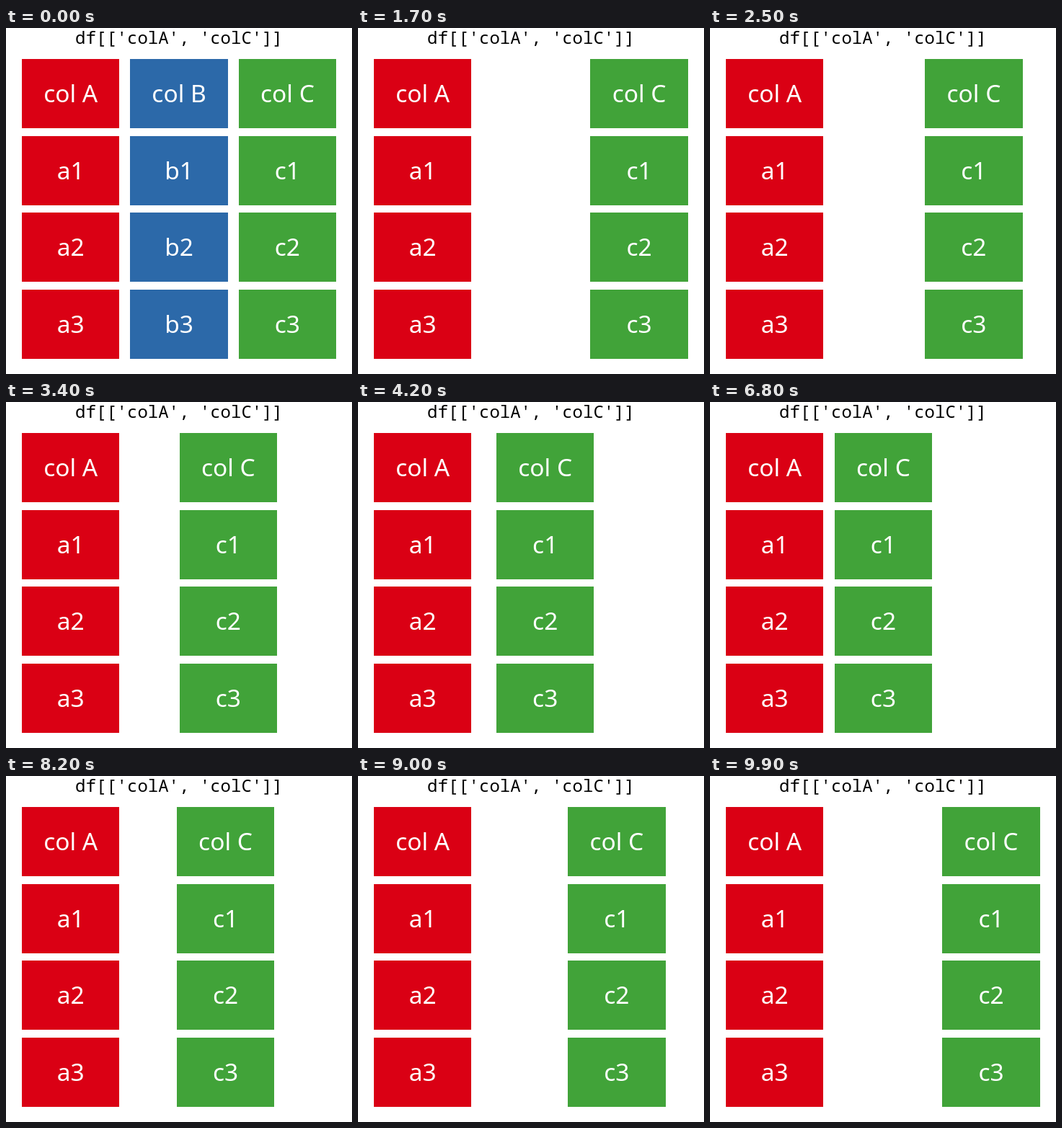
An HTML page with a canvas that plays this animation: 480 by 480 pixels, repeating every 10 s.

```html
<!DOCTYPE html>
<html lang="en">
<head>
<meta charset="utf-8">
<title>Column selection</title>
<style>
  html, body { margin: 0; width: 100%; height: 100%; overflow: hidden; background: #fff; }
  canvas { display: block; width: 480px; height: 480px; }
</style>
</head>
<body>
<canvas id="stage" width="480" height="480"></canvas>
<script>
const ctx = document.getElementById('stage').getContext('2d');

const LOOP = 10000, STEP = 100;
const CELL_W = 135.4, CELL_H = 96, TOP = 43, ROW = 106.67;
const X_A = 22, X_B = 172.4, X_C = 322.7;
const RED = '#da0014', BLUE = '#2c69a9', GREEN = '#41a339';

function ease(t, start, end) {
  const u = Math.min(1, Math.max(0, (t - start) / (end - start)));
  return (1 - Math.cos(Math.PI * u)) / 2;
}

function drawColumn(letter, x, color) {
  const left = Math.round(x), right = Math.round(x + CELL_W);
  ctx.font = '33.5px "Noto Sans", "Open Sans", sans-serif';
  for (let i = 0; i < 4; i++) {
    const y = Math.round(TOP + i * ROW);
    const label = i ? letter.toLowerCase() + i : 'col ' + letter;
    ctx.fillStyle = color;
    ctx.fillRect(left, y, right - left, CELL_H);
    ctx.fillStyle = '#fff';
    ctx.fillText(label, x + CELL_W / 2, y + 60);
  }
}

function draw(t) {
  ctx.fillStyle = '#fff';
  ctx.fillRect(0, 0, 480, 480);
  ctx.textAlign = 'center';
  ctx.textBaseline = 'alphabetic';

  ctx.fillStyle = '#000';
  ctx.font = '24px "Noto Sans Mono", "DejaVu Sans Mono", monospace';
  ctx.fillText("df[['colA', 'colC']]", 240, 22);

  // Column C slides into B's place, waits, then slides back.
  const shift = ease(t, 1600, 5000) - ease(t, 6700, LOOP);
  drawColumn('A', X_A, RED);
  if (t < 1700) drawColumn('B', X_B, BLUE);
  drawColumn('C', X_C + (X_B - X_C) * shift, GREEN);
}

function tick() {
  const t = performance.now() % LOOP;
  draw(Math.floor(t / STEP) * STEP);
  requestAnimationFrame(tick);
}
tick();
</script>
</body>
</html>
```
